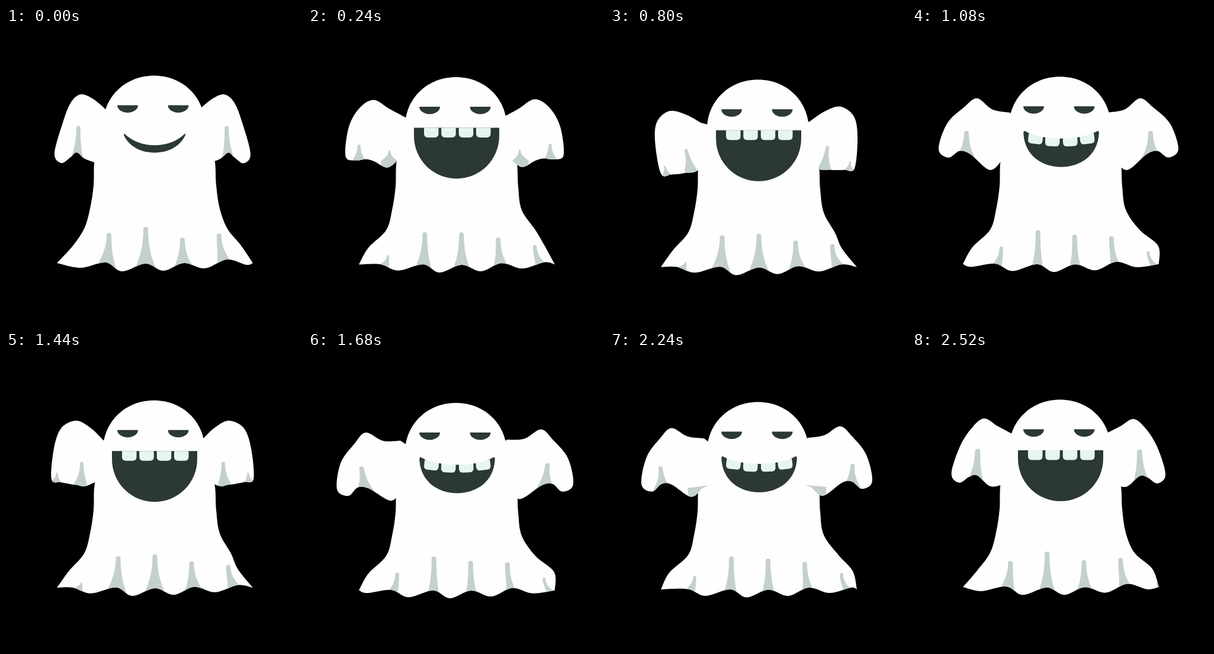
Write an HTML page that moves like this. It is 500 px wide and 500 px high and loops after 2.56 s.

```html
<!DOCTYPE html>
<html lang="en">
<head>
<meta charset="utf-8">
<title>Laughing ghost</title>
<style>
html, body { margin: 0; width: 100%; height: 100%; overflow: hidden; background: #000; }
svg { display: block; width: 100%; height: 100%; }
.cloth { fill: #fefefe; }
.fold { fill: #c4d0cd; }
.dark { fill: #2b3833; }
.teeth { fill: #e6f5f2; }
</style>
</head>
<body>
<svg viewBox="0 0 500 500">
  <defs>
    <path id="armShape"/>
    <path id="bodyShape"/>
    <path id="tooth" d="M-12.250 0h24.500v10q0 6.500-6.500 6.500h-11.500q-6.500 0-6.500-6.500z"/>
    <clipPath id="armClip"><use href="#armShape"/></clipPath>
    <clipPath id="bodyClip"><use href="#bodyShape"/></clipPath>
    <g id="arm">
      <use href="#armShape" class="cloth"/>
      <path id="armFolds" class="fold" clip-path="url(#armClip)"/>
    </g>
  </defs>
  <g id="ghost">
    <use href="#bodyShape" class="cloth"/>
    <path id="hemFolds" class="fold" clip-path="url(#bodyClip)"/>
    <use href="#arm" id="leftArm"/>
    <g transform="translate(495 0) scale(-1 1)"><use href="#arm" id="rightArm"/></g>
    <g class="dark">
      <path d="M188 130.500H223A17.500 12.500 0 0 1 188 130.500Z"/>
      <path d="M273.500 130.500H308.500A17.500 12.500 0 0 1 273.500 130.500Z"/>
    </g>
    <g class="mouth">
      <path class="dark" d="M200 178.500C213 191 231 198 251 198S290 191 302 178.500Q304 179 302 183C292 202 272 210.500 251 210.500S210 202 200 183Q198 179 200 178.500Z"/>
    </g>
    <g class="mouth">
      <path class="dark" d="M190 172H314Q316.500 173 315.500 179C313 212 286 233 252 233S191 212 188.500 179Q187.500 173 190 172Z"/>
      <g class="teeth">
        <use href="#tooth" transform="translate(209.500 177.500) rotate(7)"/>
        <use href="#tooth" transform="translate(237.500 181.500) rotate(2)"/>
        <use href="#tooth" transform="translate(267 181.500) rotate(-2)"/>
        <use href="#tooth" transform="translate(295 177.500) rotate(-7)"/>
      </g>
      <path class="cloth" d="M190 172C206 181 230 185 252 185S298 181 314 172V168H190Z"/>
    </g>
    <g class="mouth">
      <path class="dark" d="M179 166H323V180A72 72 0 0 1 179 180Z"/>
      <g class="teeth">
        <use href="#tooth" x="208.250" y="166"/>
        <use href="#tooth" x="237.500" y="166"/>
        <use href="#tooth" x="267" y="166"/>
        <use href="#tooth" x="296.250" y="166"/>
      </g>
    </g>
  </g>
</svg>
<script>
const $ = id => document.getElementById(id);
const mouths = [...document.querySelectorAll(".mouth")];
const mouthOrder = [0, 1, 2, 2, 1, 1, 2, 2];
const wave = turns => Math.cos(turns * 2 * Math.PI);
const mix = (a, b, u) => a + (b - a) * u;

// Evenly spaced key values, one per unit of s
function key(values, s) {
  const c = Math.max(0, Math.min(values.length - 1, s));
  const i = Math.min(values.length - 2, Math.floor(c));
  return mix(values[i], values[i + 1], c - i);
}

// Arm outline from neck to armpit: hanging down and spread wide
const hang = [[165, 134], [147, 117], [128, 112], [112, 126], [101, 162], [88, 215],
  [99, 231], [114, 221], [123, 211], [134, 219], [152, 229]];
const spread = [[165, 141], [136, 136], [110, 117], [88, 132], [59, 160], [45, 203],
  [62, 217], [80, 206], [98, 211], [131, 238], [152, 222]];

// Smooth curve through points, continuing from the first
function curve(pts) {
  let d = "";
  for (let i = 0; i < pts.length - 1; i++) {
    const p = pts[i], q = pts[i + 1];
    const o = pts[i - 1] || p, r = pts[i + 2] || q;
    const c = [0, 1].map(j => p[j] + (q[j] - o[j]) / 6);
    const e = [0, 1].map(j => q[j] - (r[j] - p[j]) / 6);
    d += "C" + [...c, ...e, ...q].map(v => v.toFixed(2)).join(" ");
  }
  return d;
}

// Shaded crease: rounded tip at x, y widening to mid ± half at the base
function crease(x, y, mid, half, base, width) {
  const h = base - y, w = Math.max(0, Math.min(width, h / 12));
  const l = mid - half, r = mid + half;
  return `M${l} ${base + 30}V${base}C${mix(l, x, .6)} ${base - h * .35} ${x - w} ${y + h * .35} ${x - w} ${y + w}` +
    `Q${x - w} ${y} ${x} ${y}T${x + w} ${y + w}` +
    `C${x + w} ${y + h * .4} ${mix(x + w, r, .3)} ${base - h * .3} ${r} ${base}V${base + 30}Z`;
}

// Folds drift right by one place (62 px) per turn of p
function drawBody(p) {
  const hem = [];
  let folds = "";
  for (let s = p - 1; s < 5; s++) {
    const x = 112 + 62 * s, d = s - 2.2;
    const mid = x + Math.min(16, 4 * d * Math.abs(d));
    const tip = key([402, 346, 336, 354, 347, 392], s);
    folds += crease(x, tip, mid, 14 + 4 * wave(s - .13), 404, 4);
    hem.push([mid, key([397, 396, 398, 397, 391, 397], s)]);
    hem.push([126 + 70 * s, key([396, 405, 411, 410, 406, 400, 397], s + 1)]);
  }
  const inner = hem.filter(q => q[0] > 95 && q[0] < 409);
  const down = [[336, 165], [352, 220], [355, 265], [361, 305],
    [380 - 6 * wave(p), 339], [403 + 13 * wave(p - .66), 366], [417, 397]];
  const under = [[86, 397], ...inner, [417, 397]].reverse();
  const up = [[86, 397], [106 + 6 * wave(p), 369], [132, 339], [142, 305], [148, 265], [150, 220], [164, 165]];
  $("bodyShape").setAttribute("d", "M164 165C164 116 202 80.500 250 80.500S336 116 336 165" +
    curve(down) + curve(under) + curve(up) + "Z");
  $("hemFolds").setAttribute("d", folds);
}

function drawArms(p, swing) {
  const open = (1 - wave(p - .12)) / 2;
  const droop = Math.max(0, wave(p - .25));
  const pts = hang.map(([x, y], i) => {
    const shoulder = 16 * Math.exp(-((i - 3.4) ** 2) / 2);
    const neck = 13 * Math.exp(-i * i / 2);
    const ripple = i > 5 ? 12 * Math.sin(1.3 * (i - 6.8)) : 0;
    return [mix(x, spread[i][0], open) - shoulder * droop,
      mix(y, spread[i][1], open) + (neck + ripple) * droop];
  });
  let folds = "";
  for (const s of [p, p + 1]) {
    if (s < .2 || s > 1.5) continue;
    const x = key([86, 86, 98, 122, 128, 146], 4 * s - 1);
    const y = key([202, 178, 166, 166, 184, 220], 4 * s - 1);
    folds += crease(x, y, x - 2, 9 + 9 * open, 220, 3 + 3 * open);
  }
  $("armShape").setAttribute("d", `M${pts[0]}${curve(pts)}L185 215V160Z`);
  $("armFolds").setAttribute("d", folds);
  const s = swing - .22 * open - .1 * droop;
  const pose = deg => `translate(${-s} ${-2 * s}) rotate(${-deg * s} 183 190)`;
  $("leftArm").setAttribute("transform", pose(22));
  $("rightArm").setAttribute("transform", pose(14.5));
}

function draw(ms) {
  const tick = Math.floor(ms / 40) % 64;
  const step = Math.floor(tick / 2) % 8;
  const swing = (1 - wave(tick / 32)) / 2;
  $("ghost").setAttribute("transform", `translate(0 ${8 * swing})`);
  drawBody(step / 8);
  drawArms(step / 8, swing);
  mouths.forEach((m, i) => m.setAttribute("display", i === mouthOrder[step] ? "inline" : "none"));
}

function loop() {
  draw(performance.now());
  requestAnimationFrame(loop);
}
loop();
</script>
</body>
</html>
```
